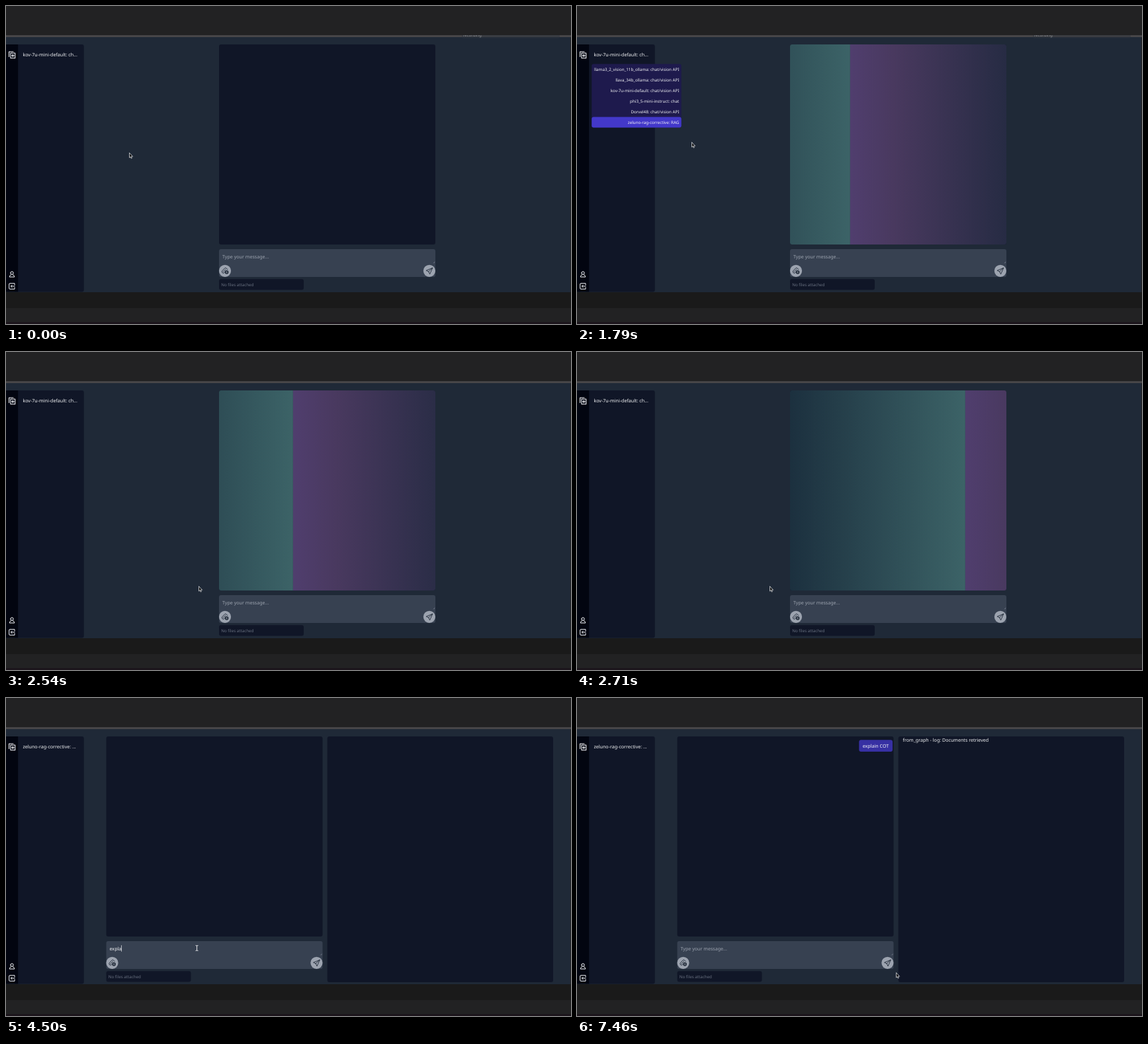
Write an HTML page with a canvas that moves like this. It is 854 px wide and 480 px high and loops after 8 s.

```html
<!DOCTYPE html>
<html lang="en">
<head>
<meta charset="utf-8">
<title>Chat model switch</title>
<style>
  html, body { margin: 0; width: 100%; height: 100%; overflow: hidden; background: #222223; }
  canvas { display: block; width: 854px; height: 480px; }
</style>
</head>
<body>
<canvas id="stage" width="854" height="480"></canvas>
<script>
const ctx = document.getElementById('stage').getContext('2d');
const LOOP = 8000;
const BASE = 7.117, SMALL = 6.227;
const WHITE = '#f3f4f6', NAVY = '#101627';

const MODELS = [
  'llama3_2_vision_11b_ollama: chat/vision API',
  'llava_34b_ollama: chat/vision API',
  'kov-7u-mini-default: chat/vision API',
  'phi3_5-mini-instruct: chat',
  'Dorvel48: chat/vision API',
  'zeluno-rag-corrective: RAG'
];
const ROW_ENTER = [1250, 1280, 1310, 1340, 1370, 1490];
const MENU = { open: 1090, close: 2000 };
const SHIMMER = { start: 1689, end: 2900, speed: 0.9 };
const SWITCH = 2900, SEND = 6450, LOG = 7440;

const PROMPT = 'explain COT';
const KEY_TIMES = [3750, 3880, 4080, 4170, 4490, 4670, 4750, 4830, 5130, 5290, 5420];

// time, x, y of the pointer tip
const PATH = [
  [420, 186.5, 222], [970, 72, 76], [1150, 70, 79], [1250, 73, 92], [1380, 77, 156],
  [1500, 79, 171.5], [1650, 84, 175], [1790, 173.5, 206], [2030, 291.5, 354],
  [2930, 291.5, 354], [3310, 288.5, 377.5], [6000, 288.5, 377.5], [6380, 468, 399],
  [6480, 470, 400], [6620, 502, 412], [6790, 482.5, 415]
];

const clamp = v => Math.max(0, Math.min(1, v));
const ramp = (t, from, span) => clamp((t - from) / span);
const smooth = v => v * v * (3 - 2 * v);

function rect(x, y, w, h, fill, radius = 0) {
  ctx.fillStyle = fill;
  ctx.beginPath();
  ctx.roundRect(x, y, w, h, radius);
  ctx.fill();
}

function text(str, x, y, size = BASE, fill = WHITE, align = 'left') {
  ctx.font = `${size}px "Noto Sans", sans-serif`;
  ctx.textAlign = align;
  ctx.fillStyle = fill;
  ctx.fillText(str, x, y);
}

function path(d, x, y, stroke, width, fill) {
  const p = new Path2D(d);
  ctx.save();
  ctx.translate(x, y);
  ctx.lineJoin = ctx.lineCap = 'round';
  if (fill) { ctx.fillStyle = fill; ctx.fill(p); }
  ctx.strokeStyle = stroke;
  ctx.lineWidth = width;
  ctx.stroke(p);
  ctx.restore();
}

function faded(alpha, draw) {
  if (alpha <= 0) return;
  ctx.save();
  ctx.globalAlpha = alpha;
  draw();
  ctx.restore();
}

function drawFrame() {
  rect(0, 0, 854, 480, '#222223');
  rect(0, 44, 854, 3, '#474648');
  rect(0, 47, 853, 385, '#1f2937');
  rect(0, 432, 854, 24, '#1a1a1a');
  rect(0, 477, 854, 3, '#1c151c');
}

function drawNotice(t) {
  const alpha = (0.45 + 0.55 * ramp(t, 40, 210)) * (1 - ramp(t, 1640, 270));
  faded(alpha, () => {
    const inset = 2 * (1 - alpha);
    rect(688 + inset, 44, 150 - 2 * inset, 5, '#2b323c', [0, 0, 2, 2]);
    ctx.beginPath();
    ctx.rect(688, 44, 150, 5);
    ctx.clip();
    text('recording', 690.5, 46.4, SMALL);
  });
}

function drawSidebar(t) {
  rect(18, 58, 99.7, 373.5, NAVY, [0, 3, 3, 0]);
  rect(0, 58, 18.2, 373.5, '#020510');
  path('M2-5H-4.4V2.4M-2-3H4.7V4.7H-2ZM1.35-1V2.7M-.5.85H3.2', 9, 74, WHITE, 1.1);
  path('M-2.2-2a2.2 2.2 0 1 1 4.4 0a2.2 2.2 0 1 1-4.4 0M-1.3.5Q-3.8 1.6-3.8 4H3.8Q3.8 1.6 1.3.5', 9, 405, WHITE, 1);
  path('M4-1.8V-4.3H-3Q-4.3-4.3-4.3-3V3Q-4.3 4.3-3 4.3H4V1.8M4 0H-1.6M.2-1.8L-1.6 0L.2 1.8', 9, 423, WHITE, 1);
  text(t < SWITCH ? 'kov-7u-mini-default: ch...' : 'zeluno-rag-corrective: ...', 25.4, 76.4);
}

function drawShimmer(t, x) {
  const width = 327, tile = width * 2;
  const shift = ((t - SHIMMER.start) * SHIMMER.speed) % tile;
  ctx.save();
  ctx.beginPath();
  ctx.roundRect(x, 58, width, 302, 3);
  ctx.clip();
  for (const start of [x + shift - tile, x + shift]) {
    const g = ctx.createLinearGradient(start, 0, start + tile, 0);
    g.addColorStop(0, '#503e6e');
    g.addColorStop(0.1, '#49395f');
    g.addColorStop(0.5, '#142435');
    g.addColorStop(1, '#3c6367');
    rect(start, 58, tile, 302, g);
  }
  ctx.restore();
}

function drawButton(x, icon) {
  ctx.fillStyle = '#9ca3af';
  ctx.beginPath();
  ctx.arc(x, 399.8, 9.1, 0, 7);
  ctx.fill();
  path(icon, x, 399.8, '#1f2937', 0.9);
}

function drawInput(t, x) {
  rect(x, 367, 327, 42, '#374151', 3);
  const typed = t < SEND ? KEY_TIMES.filter(k => k <= t).length : 0;
  const entry = PROMPT.slice(0, typed);
  if (typed) text(entry, x + 5, 380.6);
  else text('Type your message...', x + 5, 380.6, BASE, '#9ca3af');
  if (t >= SWITCH && t < SEND) {
    ctx.font = `${BASE}px "Noto Sans", sans-serif`;
    rect(x + 5 + ctx.measureText(entry).width, 373.2, 0.7, 9.6, WHITE);
  }
  path('M0 2L2 0M1.2 2L2 1.2', x + 324, 386, '#9ca3af', 0.4);
  drawButton(x + 9, 'M3.8-2.1L1.8-4.2Q.7-5-.4-4L-4.1-.1Q-5.4 1.5-3.9 2.9Q-2.4 4.1-1 2.7L2.1-.5M-2.7 1.4L1-2.3');
  ctx.fillStyle = '#1f2937';
  ctx.beginPath();
  ctx.arc(x + 11.6, 401.8, 2.8, 0, 7);
  ctx.fill();
  path('M-1.3 0H1.3M0-1.3V1.3', x + 11.6, 401.8, '#9ca3af', 0.6);
  drawButton(x + 317.9, 'M4.6-4.4L-4.8-.5L-1.2 1L.5 4.6ZM4.6-4.4L-1.2 1');
  rect(x, 412.3, 128, 16.3, NAVY, 3);
  text('No files attached', x + 3.2, 422.7, SMALL, '#697180');
}

function drawChat(t) {
  const x = t < SWITCH ? 322 : 151.5;
  rect(x, 58, 327, 302, NAVY, 3);
  if (t >= SHIMMER.start && t < SHIMMER.end) drawShimmer(t, x);
  drawInput(t, x);
  if (t >= SEND) {
    rect(426.3, 63.3, 50.7, 17.6, '#3730a3', 3);
    text(PROMPT, 431.7, 74.6);
  }
  faded(ramp(t, 2930, 200), () => rect(485.7, 58, 341.3, 371, NAVY, 3));
  if (t >= LOG) text('from_graph - log: Documents retrieved', 492.5, 65.8);
}

function drawMenu(t) {
  if (t < MENU.open || t >= MENU.close) return;
  rect(22.2, 87.6, 135.5, 95.8, '#1e1a4d', 3);
  MODELS.forEach((name, i) => {
    const y = 87.6 + 15.97 * i;
    const leave = i < 5 ? ROW_ENTER[i + 1] : Infinity;
    faded(ramp(t, ROW_ENTER[i], 100) * (1 - ramp(t, leave, 100)),
      () => rect(22.2, y, 135.5, 15.97, '#4338ca', 3));
    text(name, 154.3, y + 10.2, SMALL, WHITE, 'right');
  });
}

function pointerAt(t) {
  const next = PATH.findIndex(p => p[0] > t);
  if (next === 0) return PATH[0].slice(1);
  if (next < 0) return PATH[PATH.length - 1].slice(1);
  const [t0, x0, y0] = PATH[next - 1], [t1, x1, y1] = PATH[next];
  const k = smooth((t - t0) / (t1 - t0));
  return [x0 + (x1 - x0) * k, y0 + (y1 - y0) * k];
}

function drawPointer(t) {
  const [x, y] = pointerAt(t);
  const inside = (l, top, r, b) => x > l && x < r && y > top && y < b;
  const overMenu = t >= MENU.open && t < MENU.close && inside(22, 88, 157, 183);
  const overSend = t > 6000 && Math.hypot(x - 469, y - 400) < 9;
  if (overMenu || overSend || inside(20, 66, 116, 82)) {
    path('M-.7 5V.8Q0-.3.8.8V3.5L3.4 4.3Q4.2 4.7 3.9 6L3.2 8.6H-.3L-2.5 5.6Q-2.2 4.5-.7 5.6Z', x, y, WHITE, 0.7, '#111');
  } else if (t > SWITCH && inside(151.5, 367, 478, 409)) {
    path('M-1.6-3.8H-.5L0-3.4L.5-3.8H1.6M0-3.4V3.4M-1.6 3.8H-.5L0 3.4L.5 3.8H1.6', x, y, WHITE, 0.9);
  } else {
    path('M0 0V7L1.6 5.6L2.8 8.1L3.8 7.6L2.7 5.2H4.7Z', x, y, WHITE, 0.7, '#111');
  }
}

function render(now) {
  const t = now % LOOP;
  drawFrame();
  drawNotice(t);
  drawSidebar(t);
  drawChat(t);
  drawMenu(t);
  drawPointer(t);
}

ctx.textRendering = 'geometricPrecision';
let origin;
function tick(now) {
  origin ??= now;
  render(now - origin);
  requestAnimationFrame(tick);
}
render(0);
requestAnimationFrame(tick);
</script>
</body>
</html>
```
